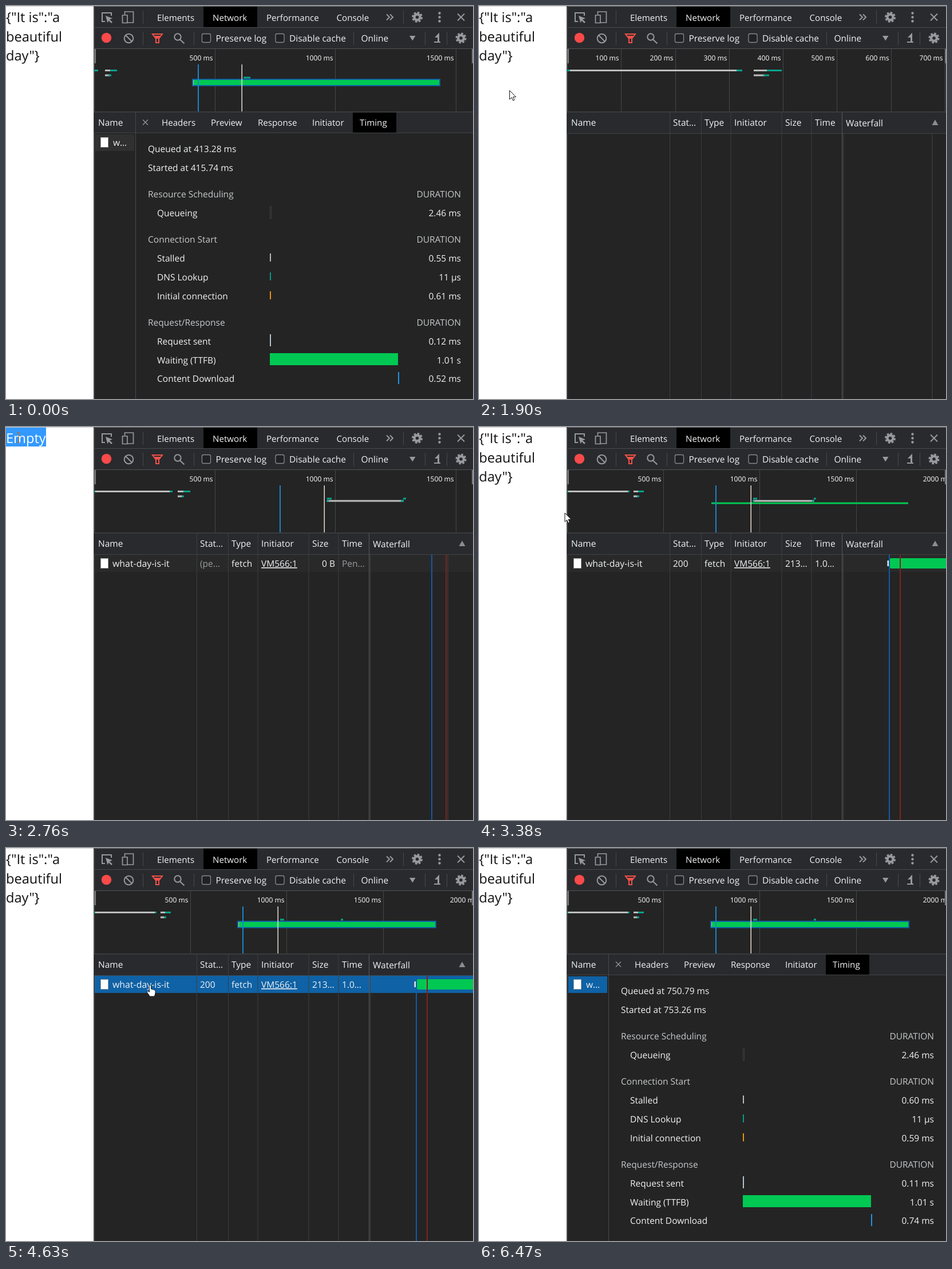
Write an HTML page that moves like this. It is 816 px wide and 686 px high and loops after 6.86 s.

```html
<!DOCTYPE html>
<html lang="en">
<head>
<meta charset="utf-8">
<title>Network timing</title>
<style>
  html, body { margin: 0; width: 100%; height: 100%; overflow: hidden; background: #fff; }
  svg { display: block; width: 816px; height: 686px; }
  text { font: 15.5px "Open Sans", "Noto Sans", sans-serif; fill: #f1f2f4; text-rendering: geometricPrecision; }
  .tab { font-size: 15.15px; }
  .big { font-size: 23.6px; fill: #111; }
  .tick { font-size: 12.1px; fill: #fff; }
  .dim { fill: #9a9c9f; }
  .head { fill: #c6c8cb; }
  .icon { fill: none; stroke: #96999d; stroke-width: 2; }
  .end { text-anchor: end; }
</style>
</head>
<body>
<svg viewBox="0 0 816 686">
  <g id="page"></g>
  <g id="chrome"></g>
  <g id="overview"></g>
  <g id="main"></g>
  <g id="cursor"></g>
</svg>
<script>
const LOOP = 6860, LEFT = 154, WIDTH = 662;
const GREEN = '#00c853', TEAL = '#06a38c', GRAY = '#bdbdbd', BAR = '#292a2d', LINE = '#46494d', BODY = '#242424';

const BURSTS = [
  [290, 440, 3], [600, 900, 5], [1290, 1290, 1], [1440, 2070, 9], [2160, 2760, 9],
  [3080, 3690, 9], [3770, 4000, 4], [4230, 4460, 4], [4630, 4770, 3],
  [4930, 5550, 9], [5700, 6330, 9], [6390, 6470, 2]
];
// [time, x, y]
const POINTER = [
  [290, 676, 648], [365, 420, 545], [440, 147, 415], [600, 135, 408], [825, 75, 387], [900, 85, 397],
  [1290, 85, 397], [1440, 82, 380], [2070, 44, 70], [2235, 36, 36], [2460, 22, 18], [3080, 22, 18],
  [3385, 150, 150], [3690, 236, 250], [3847, 233, 246], [4000, 232, 240], [4460, 252, 239],
  [4770, 252, 239], [4930, 248, 232], [5162, 624, 364], [5550, 777, 633], [5700, 770, 628],
  [5930, 738, 612], [6170, 786, 609], [6330, 772, 615], [6390, 796, 657]
];
const SPAN = [[1290, 108], [2235, 1010], [2760, 1572], [3080, 1968]];

const FIRST = {
  dom: 433, load: 613, start: 411, end: 1433, queued: '413.28', started: '415.74',
  stalled: '0.55', connect: '0.61', sent: '0.12', download: '0.52',
  items: [[111, 0, 16, TEAL], [111, 46, 70, GRAY], [111, 66, 95, TEAL],
    [119.5, 46, 66, GRAY], [119.5, 60, 72, TEAL], [123.5, 620, 648, TEAL]]
};
const SECOND = {
  dom: 772, load: 954, start: 750, end: 1773, queued: '750.79', started: '753.26',
  stalled: '0.60', connect: '0.59', sent: '0.11', download: '0.74',
  items: [[111, 0, 325, GRAY], [111, 0, 5, TEAL], [111, 314, 325, TEAL], [111, 346, 372, GRAY],
    [111, 370, 398, TEAL], [119.5, 346, 366, GRAY], [119.5, 364, 374, TEAL],
    [123.5, 966, 986, TEAL], [127.5, 966, 1285, GRAY], [127.5, 964, 973, TEAL],
    [127.5, 1273, 1285, TEAL], [123.5, 1282, 1294, TEAL]]
};

const el = id => document.getElementById(id);
const rect = (x, y, w, h, fill, more = '') =>
  `<rect x="${x}" y="${y}" width="${w}" height="${h}" fill="${fill}" ${more}/>`;
const text = (x, y, s, cls = '', more = '') => `<text x="${x}" y="${y}" class="${cls}" ${more}>${s}</text>`;
const icon = (d, more = '') => `<path class="icon" d="${d}" ${more}/>`;
const shape = (d, fill, more = '') => `<path d="${d}" fill="${fill}" ${more}/>`;

function snap(t) {
  let s = 0;
  for (const [a, b, n] of BURSTS) {
    if (t < a) break;
    const step = (b - a) / (n - 1);
    s = n > 1 ? a + step * Math.min(n - 1, Math.floor((t - a) / step + .22)) : a;
  }
  return s;
}

// Linear interpolation of every column after the first
function along(keys, t) {
  const i = keys.findIndex(k => k[0] > t);
  if (i < 0) return keys[keys.length - 1].slice(1);
  if (i === 0) return keys[0].slice(1);
  const a = keys[i - 1], b = keys[i], p = (t - a[0]) / (b[0] - a[0]);
  return a.slice(1).map((v, k) => v + (b[k + 1] - v) * p);
}

const gear = (x, y) => `<g class="icon"><circle cx="${x}" cy="${y}" r="5" stroke-width="4.4"/>
  <circle cx="${x}" cy="${y}" r="8" stroke-width="3" stroke-dasharray="3.6 2.68"/></g>`;
const checkbox = x => rect(x, 48.5, 15, 15, '#202124', 'rx="2.5" stroke="#87898c" stroke-width="1.3"');

function toolbar() {
  const tabs = [[264, 'Elements'], [361, 'Network'], [455, 'Performance'], [577.5, 'Console']];
  const seps = [[239, 8], [694, 8], [239, 45], [328, 45], [607, 45], [732, 45], [770, 45]];
  return rect(0, 0, 153, 1, '#cfcfcf') + rect(153, 0, 663, 686, BODY) + rect(153, 0, 663, 74, BAR)
    + rect(153, 0, 663, 1, '#737578') + rect(153, 37, 663, 1, LINE) + rect(153, 74, 663, 1, '#505357')
    + rect(153, 0, 2, 686, '#48494b') + rect(345, 1, 94, 36, '#000')
    + tabs.map(([x, s]) => text(x, 25.5, s, 'tab')).join('')
    + seps.map(([x, y]) => rect(x, y, 1, 23, LINE)).join('')
    + icon('M173 27H168V12H184V17', 'stroke-width="1.8"')
    + shape('M174 17L186 21.5L181 23.5L186 28L184 30L179.5 25.5L177.5 29.5Z', '#96999d')
    + icon('M207.5 15V10H222.5V29H212M203.5 16H212V29.5H203.5Z', 'style="stroke-width:1.7"')
    + icon('M665 14.5L670 19.5L665 24.5M671 14.5L676 19.5L671 24.5')
    + gear(718.5, 19.5) + [12.5, 19.5, 26.5].map(y => `<circle cx="757.5" cy="${y}" r="2.2" fill="#96999d"/>`).join('')
    + icon('M789 13.5L801 25.5M801 13.5L789 25.5')
    + '<circle cx="175.5" cy="55.5" r="8.7" fill="#f94a4a"/>'
    + '<circle class="icon" cx="214.5" cy="56.5" r="7.8"/>' + icon('M209 51L220 62')
    + icon('M256 49H273L267 57V64H262V57Z', 'style="stroke:#f25149"') + shape('M259 52H270L266 57H263Z', '#f25149')
    + '<circle class="icon" cx="300" cy="54" r="5.7"/>' + icon('M304 58.5L311.5 65.5')
    + checkbox(342.5) + text(366.5, 62, 'Preserve log') + checkbox(471) + text(495, 62, 'Disable cache')
    + text(620.5, 62, 'Online') + shape('M705 52H715.5L710.3 60.5Z', '#96999d')
    + shape('M754 63V55H749L757 46.5V63Z', '#96999d') + icon('M748 63H759') + gear(795, 56);
}

function overview(run, span, now, state) {
  const scale = WIDTH / span, x = ms => Math.round(LEFT + ms * scale);
  const gap = 94;
  let step = 10 ** Math.ceil(Math.log10(span * gap / WIDTH)), out = '';
  if (step * scale >= 5 * gap) step /= 5;
  else if (step * scale >= 2 * gap) step /= 2;

  for (let ms = step; ms <= span + step; ms += step) {
    out += rect(x(ms), 75, 1, 109, '#444649') + text(x(ms) - 3.5, 94.5, ms + ' ms', 'tick end');
  }
  out += rect(154, 75, 1, 109, '#505357') + rect(154, 75, 3, 25, '#77797c') + rect(814, 75, 2, 25, '#77797c');
  for (const [y, a, b, fill] of run.items) {
    if (a < now) out += rect(x(a), y, x(Math.min(b, now)) - x(a), 3, fill);
  }
  const a = x(run.start), w = x(run.end) - a;
  if (state.selected) {
    out += rect(a - 2, 127, w + 4, 13, '#1060a3') + rect(a, 129, w, 9, GREEN) + rect(a, 129, 1, 9, GRAY);
  } else if (state.done) {
    out += rect(a, 131.5, w, 3, GREEN);
  }
  if (run.dom < now) out += rect(x(run.dom) - 1, 102, 2, 82, '#1a86c8');
  if (run.load < now) out += rect(x(run.load) - .5, 102, 1.5, 82, '#eadcd4');
  return out + rect(154, 184.5, 662, 1, '#505357');
}

const fileIcon = rect(165.5, 229.5, 13, 17, '#fff', 'stroke="#a0a0a0"');

function table(t, span, now, state) {
  const heads = [[161, 'Name'], [339, 'Stat…'], [394, 'Type'], [446, 'Initiator'], [535, 'Size'], [587, 'Time'], [641, 'Waterfall']];
  const left = 637, scale = (state.done ? 205 : 218) / span;
  let out = rect(154, 186, 662, 36, BAR) + rect(154, 222, 662, 1, '#404347');
  if (state.row) out += rect(155, 223, 661, 30, state.selected ? '#0f62a5' : state.hover ? '#1a2537' : '#292929');
  for (const x of [333, 388, 439.5, 528.5, 580.5]) out += rect(x, 186, 1, 500, '#3c3e41');
  out += rect(634, 186, 1, 500, '#585a5d') + rect(636, 223, 1, 463, '#434547');
  out += heads.map(([x, s]) => text(x, x > 640 ? 210 : 209, s)).join('') + shape('M791.5 208H802.5L797 198.5Z', '#8a8d91');

  const unit = scale > .18 ? 500 : 970;
  const grid = t < 1440 ? 727 : left + unit * scale * (state.done ? .98 : 1);
  out += rect(Math.round(grid) - .5, 223, 1, 463, '#444648');
  if (!state.row) return out;

  const dim = state.done ? '' : 'dim';
  out += fileIcon + text(186, 244, 'what-day-is-it', '', 'style="font-size:15.9px"')
    + text(339, 244, state.done ? '200' : '(pe…', dim) + text(394, 244, 'fetch')
    + text(446, 244, 'VM566:1', '', 'text-decoration="underline"')
    + (state.done ? text(535, 244, '213…') : text(575, 244, '0 B', 'end'))
    + text(587, 244, state.done ? '1.0…' : 'Pen…', dim);
  if (state.done) out += rect(713.5, 233, 3, 10, '#e8e8e8') + rect(718, 229, 102, 18, GREEN, 'rx="2"');
  const mark = (ms, fill) => ms < now ? rect(Math.round(left + ms * scale) - 1, 223, 2, 463, fill) : '';
  out += mark(SECOND.dom, '#1659a8') + mark(SECOND.load, '#7d2320');

  const fade = t < 4630 ? Math.max(0, Math.min(1, (t - 3735) / 260)) : 0;
  if (fade) {
    out += `<g opacity="${fade}">` + rect(247, 262, 281, 34, '#2b2b2b')
      + text(260, 283.5, 'http://localhost:3001/what-day-is-it', '', 'style="font-size:15.7px"') + '</g>';
  }
  return out;
}

function timing(run, selected) {
  const tabs = [[272, 'Headers'], [358, 'Preview'], [440, 'Response'], [535, 'Initiator'], [618, 'Timing']];
  const groups = [[328, 'Resource Scheduling'], [407, 'Connection Start'], [552, 'Request/Response']];
  const rows = [
    [361, 'Queueing', '2.46 ms'], [440, 'Stalled', run.stalled + ' ms'], [473, 'DNS Lookup', '11 µs'],
    [506, 'Initial connection', run.connect + ' ms'], [585, 'Request sent', run.sent + ' ms'],
    [618, 'Waiting (TTFB)', '1.01 s'], [650, 'Content Download', run.download + ' ms']
  ];
  return rect(154, 186, 662, 35, BAR) + rect(154, 221, 662, 1, '#404347') + rect(606, 186, 76, 35, '#000')
    + rect(156, 224, 68, 29, selected ? '#0f62a5' : '#303030') + rect(226, 186, 1, 500, LINE)
    + text(161, 209, 'Name') + fileIcon + text(187, 244, 'w…')
    + icon('M239 198.5L248 207.5M248 198.5L239 207.5', 'style="stroke-width:1.2"')
    + tabs.map(([x, s]) => text(x, 209, s, 'tab')).join('')
    + text(248, 255, `Queued at ${run.queued} ms`) + text(248, 287.5, `Started at ${run.started} ms`)
    + groups.map(([y, s]) => text(248, y + 6, s, 'head') + text(795, y + 6, 'DURATION', 'head end')).join('')
    + rows.map(([y, s, v]) => text(264, y + 6, s) + text(795, y + 6, v, 'end')).join('')
    + rect(461.5, 350, 2, 21, '#1e1e1e', 'stroke="#4a4a4a" stroke-width=".8"')
    + rect(461, 432, 2, 14, '#bdbdbd') + rect(461, 465, 2, 14, '#0b9a88') + rect(461, 498, 2, 14, '#e99314')
    + rect(461, 573, 2, 21, '#b4c3cc') + rect(461, 606, 224, 21, GREEN) + rect(685, 639, 2, 21, '#2196e3');
}

function page(t) {
  if (t >= 1985 && t < 3080) {
    const picked = t > 2600;
    return (picked ? rect(0, 1, 70, 33, '#3399ff') : '') + text(0, 28, 'Empty', 'big', picked ? 'style="fill:#fff"' : '');
  }
  return ['{"It is":"a', 'beautiful', 'day"}'].map((s, i) => text(0, 28 + i * 33.5, s, 'big')).join('');
}

function pointer(t, x, y, hand) {
  if (t < 290 || t >= 6470) return '';
  const at = `transform="translate(${x} ${y})"`;
  if (t > 2300 && t <= 3160 && y < 32) {
    return `<path ${at} d="M-3 -8H3M0 -8V9M-3 9H3" fill="none" stroke="${t > 2600 ? '#cc6600' : '#111'}"/>`;
  }
  if (hand) {
    return shape('M-1.5 1Q0 -1 1.5 1V7L7 8.5Q9 9 9 11V14Q8.5 18 7 20H-1Q-2 17 -5 14Q-6 11 -4 10.5L-1.5 12.5Z',
      '#fff', `stroke="#111" stroke-width=".9" ${at}`);
  }
  return shape('M0 0V15.5L3.6 12.2L6 17.5L8.4 16.4L6.1 11.3H11Z', '#fff', `stroke="#111" stroke-width="1" ${at}`);
}

function draw(t) {
  const first = t < 1290, run = first ? FIRST : SECOND;
  const span = first ? 1572 : along(SPAN, t)[0];
  const done = first || t >= 3080, now = done ? Infinity : span - 110;
  const [x, y] = along(POINTER, t);
  const open = first || t >= 4700;
  const state = {
    done, selected: first || t >= 4630, row: now > SECOND.start - 10,
    hover: x > LEFT && y > 222 && y < 253
  };
  el('page').innerHTML = page(t);
  el('overview').innerHTML = overview(run, span, now, state);
  el('main').innerHTML = open ? timing(run, !first) : table(t, span, now, state);
  el('cursor').innerHTML = pointer(t, x, y, !open && state.hover);
}

let shown = -1;
function tick() {
  const t = snap(performance.now() % LOOP);
  if (t !== shown) draw(shown = t);
  requestAnimationFrame(tick);
}
el('chrome').innerHTML = toolbar();
tick();
</script>
</body>
</html>
```
